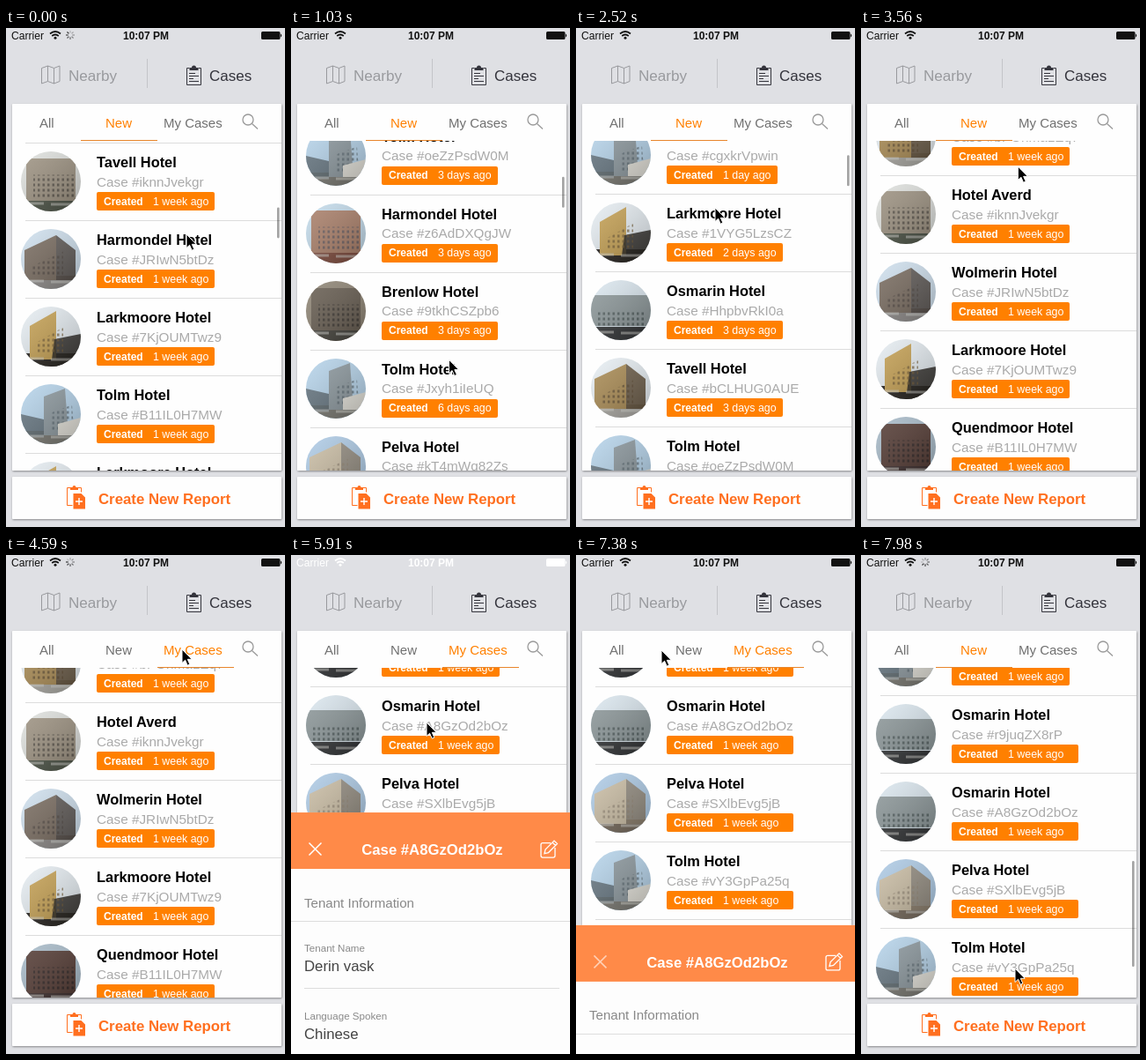
Animation of 317x566 px, one loop 8000 ms. Source, as an HTML page:

```html
<!DOCTYPE html>
<html lang="en">
<head>
<meta charset="utf-8">
<title>Case list</title>
<style>
html, body { margin: 0; width: 100%; height: 100%; overflow: hidden; background: #dfe0e4; }
svg { display: block; }
#stage { width: 100%; height: 100%; }
text { font-family: "Liberation Sans", Arial, sans-serif; fill: currentColor; white-space: pre; }
.line { fill: none; stroke: currentColor; }
.bold { font-weight: 700; }
.name { font-size: 16.4px; font-weight: 700; fill: #000; }
.code { font-size: 15.3px; fill: #aaa; }
.badge { font-size: 12.4px; color: #fff; }
.tab { font-size: 15px; }
.label { font-size: 11.6px; color: #8a8a8a; }
.value { font-size: 16.8px; color: #444; }
</style>
</head>
<body>
<svg id="stage" viewBox="0 0 317 566">
  <defs>
    <clipPath id="disc"><circle cx="34" cy="34" r="34"/></clipPath>
    <linearGradient id="shade" x2="1" y2="1">
      <stop stop-color="#fff" stop-opacity=".15"/>
      <stop offset="1" stop-color="#000" stop-opacity=".25"/>
    </linearGradient>
    <filter id="lift" x="-5%" y="-5%" width="110%" height="115%">
      <feDropShadow dx="0.5" dy="1" stdDeviation="0.8" flood-opacity=".4"/>
    </filter>
  </defs>
  <rect width="317" height="566" fill="#dfe0e4"/>

  <g color="#999a9e">
    <path class="line" d="M40.5 45.5l7-2.5 7 2.5 6.500-2.500v17.500l-6.500 2.500-7-2.500-7 2.500zM47.500 43v17.500M54.500 45.500v17.500"/>
    <text x="71" y="59.500" font-size="17.100">Nearby</text>
  </g>
  <path d="M160.500 35v33" stroke="#c3c4c8"/>
  <g color="#34343c">
    <path class="line" d="M208.500 45.500h-3v19h16v-19h-3"/>
    <path fill="currentColor" d="M208.500 48v-3h2.500a2.500 2.500 0 0 1 5 0h2.500v3z"/>
    <path class="line" d="M208 51.500h7M208 54.500h11M208 57.500h5M208 60.500h11"/>
    <text x="231" y="59.500" font-size="17">Cases</text>
  </g>

  <rect x="7" y="86" width="306" height="416" rx="1" fill="#fefefe" filter="url(#lift)"/>
  <text class="tab" x="38" y="112.500" color="#707070">All</text>
  <text class="tab" id="tabNew" x="113" y="112.500">New</text>
  <text class="tab" id="tabMine" x="179" y="112.500">My Cases</text>
  <g class="line" color="#999" stroke-width="1.300">
    <circle cx="275" cy="104" r="6"/><path d="M279.500 108.500l6.500 6"/>
  </g>
  <svg x="7" y="128" width="306" height="374" overflow="hidden">
    <g id="listNew"></g>
    <g id="listMine"></g>
  </svg>
  <rect id="underline" y="127" width="87" height="1" fill="#e8862c"/>
  <rect id="bar" x="308" width="2.600" rx="1.300" fill="#000" opacity=".36"/>

  <rect x="7" y="509" width="306" height="48" rx="1" fill="#fefefe" filter="url(#lift)"/>
  <g color="#ff6f1f">
    <path class="line" d="M73 521.500h-3.500v20h6M82 521.500h3.500v5"/>
    <path fill="currentColor" d="M73 524v-3h2.500a2 2 0 0 1 4 0H82v3zM76.500 528h9l4.500 4.500v13H76.500z"/>
    <path stroke="#fff" stroke-width="1.400" d="M83 533v8M79 537h8"/>
    <text class="bold" x="105" y="540" font-size="16.800">Create New Report</text>
  </g>

  <g id="sheet">
    <rect width="317" height="566" fill="#fdfdfd"/>
    <rect width="317" height="64" fill="#ff8a48"/>
    <g color="#fff">
      <path id="close" class="line" stroke-width="1.500" d="M20.500 34.500l14 14M34.500 34.500l-14 14"/>
      <text class="bold" x="160.500" y="48" font-size="16.700" text-anchor="middle">Case #A8GzOd2bOz</text>
      <path class="line" stroke-width="1.300" d="M295 34.500h-9q-2 0-2 2V49q0 2 2 2h12q2 0 2-2V40M288 46.500l1-4.500 10-10 3.500 3.500-10 10zM297 34l3.500 3.500"/>
    </g>
    <text x="15" y="107.500" font-size="15.100" color="#888">Tenant Information</text>
    <path stroke="#dcdcdc" d="M0 123.500h317M15 199.500h290M15 276.500h290"/>
    <text class="label" x="15" y="157.500">Tenant Name</text>
    <text class="value" x="15" y="180">Derin vask</text>
    <text class="label" x="15" y="234.500">Language Spoken</text>
    <text class="value" x="15" y="257">Chinese</text>
  </g>

  <g id="status">
    <text x="6" y="12.500" font-size="12.100">Carrier</text>
    <path class="line" stroke-width="1.700" d="M50 6.500q6-5 12 0M52.200 9q3.800-3 7.600 0"/>
    <circle cx="56" cy="11.300" r="1.500" fill="currentColor"/>
    <g id="spinner"></g>
    <text class="bold" x="133" y="12.500" font-size="12">10:07 PM</text>
    <path fill="currentColor" d="M291.500 4h18.500q1.500 0 1.500 1.500v6q0 1.500-1.500 1.500h-18.500q-1.500 0-1.500-1.500v-6q0-1.500 1.500-1.500zM312 6.500q2.500 2 0 4z"/>
  </g>

  <path id="cursor" d="M0 0v15.500l3.600-3.300 2.600 6 2.700-1.200-2.600-5.700h4.900z" fill="#000" stroke="#fff"/>
</svg>

<script>
const $ = id => document.getElementById(id);
const TICK = 147.5, LOOP = 8000, ROW = 88;

// Flat building pictures: shape, sky, wall, windows, ground
const PHOTOS = {
  facade: ["front", "#dfe1de", "#9c9180", "#453f38", "#4c5346"],
  brown:  ["corner", "#cfe0ee", "#776a5e", "#4a423c", "#8d8a88"],
  yellow: ["block", "#e6edf2", "#c5a052", "#6e5630", "#25211d"],
  tower:  ["tower", "#b5d3ea", "#8b979d", "#56646d", "#77766f"],
  dark:   ["front", "#a7bac8", "#513831", "#211c1d", "#3b2c2b"],
  umber:  ["front", "#8d8373", "#655b4f", "#2e2a27", "#45433c"],
  green:  ["wide", "#dbe7ef", "#8b9698", "#3f4a4c", "#303234"],
  tan:    ["corner", "#e8eff4", "#a98a52", "#57452c", "#aaa8a2"],
  beige:  ["corner", "#aecbe6", "#cabda4", "#8f826f", "#74685a"],
  rust:   ["front", "#c4dcec", "#a97e68", "#54525a", "#7d4a3c"]
};
const SHAPES = {
  front:  ["M6 8H62V56H6z"],
  wide:   ["M0 17H68V52H0z"],
  corner: ["M4 24L40 7V58H4z", "M40 7L62 24V58H40z"],
  block:  ["M10 22L40 5V60H10z", "M38 37L68 31V68H34z"],
  tower:  ["M26 14L50 5L54 58H26z", "M0 34L26 40V60H0z"]
};

function photo(kind) {
  const [shape, sky, wall, glass, ground] = PHOTOS[kind];
  const [main, side] = SHAPES[shape];
  let windows = "";
  for (let y = 20; y < 54; y += 6) windows += `M8 ${y}H60`;
  return `<g clip-path="url(#disc)"><rect width="68" height="68" fill="${sky}"/>
    <rect y="53" width="68" height="15" fill="${ground}"/>
    <path d="${main}" fill="${wall}"/>
    ${side ? `<path d="${side}" fill="${shape == "block" ? ground : glass}" opacity=".85"/>` : ""}
    <path d="${windows}" stroke="${glass}" stroke-width="3" stroke-dasharray="2.5 3" opacity=".7"
      clip-path="path('${main}')"/>
    ${shape == "tower" ? '<path d="M42 45L68 38V58H42z" fill="#e4e2da"/>' : ""}
    <path d="M8 59h18M34 60h24" stroke="#d9d9d4" stroke-width="3" opacity=".5"/>
    <rect width="68" height="68" fill="url(#shade)"/></g>`;
}

const BADGE_WIDTH = { week: 134, days: 132, day: 126 };

function row([name, code, age, kind], index) {
  return `<g transform="translate(0 ${index * ROW})">
    <path d="M15 .5h291" stroke="#dcdcdc"/>
    <g transform="translate(10 10)">${photo(kind)}</g>
    <text class="name" x="96" y="28">${name}</text>
    <text class="code" x="96" y="49.500">Case #${code}</text>
    <g class="badge"><rect x="96" y="56" width="${BADGE_WIDTH[age.split(" ")[1]]}" height="21" rx="2" fill="#ff8000"/>
    <text class="bold" x="104" y="70.500" font-size="12">Created</text>
    <text x="160" y="70.500">${age}</text></g></g>`;
}

const newCases = [
  ["Pelva Hotel", "Wn5tQe30Lk", "1 day ago", "beige"],
  ["Osmarin Hotel", "hR7uVxM2pd", "1 day ago", "green"],
  ["Tolm Hotel", "cgxkrVpwin", "1 day ago", "tower"],
  ["Larkmoore Hotel", "1VYG5LzsCZ", "2 days ago", "yellow"],
  ["Osmarin Hotel", "HhpbvRkI0a", "3 days ago", "green"],
  ["Tavell Hotel", "bCLHUG0AUE", "3 days ago", "tan"],
  ["Tolm Hotel", "oeZzPsdW0M", "3 days ago", "tower"],
  ["Harmondel Hotel", "z6AdDXQgJW", "3 days ago", "rust"],
  ["Brenlow Hotel", "9tkhCSZpb6", "3 days ago", "umber"],
  ["Tolm Hotel", "Jxyh1iIeUQ", "6 days ago", "tower"],
  ["Pelva Hotel", "kT4mWq82Zs", "6 days ago", "beige"],
  ["Tavell Hotel", "bPOnmaLEq7", "1 week ago", "tan"],
  ["Hotel Averd", "iknnJvekgr", "1 week ago", "facade"],
  ["Wolmerin Hotel", "JRIwN5btDz", "1 week ago", "brown"],
  ["Larkmoore Hotel", "7KjOUMTwz9", "1 week ago", "yellow"],
  ["Quendmoor Hotel", "B11IL0H7MW", "1 week ago", "dark"],
  ["Larkmoore Hotel", "vD8sYc61Ro", "1 week ago", "yellow"]
];

// Before the reload some cases still carry another hotel
const renamed = {
  "Hotel Averd": ["Tavell Hotel", "facade"],
  "Wolmerin Hotel": ["Harmondel Hotel", "brown"],
  "Quendmoor Hotel": ["Tolm Hotel", "tower"]
};
const staleCases = newCases.map(([name, code, age, kind]) => {
  const [oldName, oldKind] = renamed[name] || [name, kind];
  return [oldName, code, age, oldKind];
});

// The second list is only ever seen from this row on
const FIRST_MINE = 7;
const myCases = [
  ["Tolm Hotel", "Gq2LrX94ne", "1 week ago", "tower"],
  ["Osmarin Hotel", "r9juqZX8rP", "1 week ago", "green"],
  ["Osmarin Hotel", "A8GzOd2bOz", "1 week ago", "green"],
  ["Pelva Hotel", "SXlbEvg5jB", "1 week ago", "beige"],
  ["Tolm Hotel", "vY3GpPa25q", "1 week ago", "tower"],
  ["Larkmoore Hotel", "uM6wTk07Hs", "1 week ago", "yellow"]
];

const rows = (cases, first = 0) => cases.map((item, i) => row(item, i + first)).join("");
$("listNew").innerHTML = `<g id="stale">${rows(staleCases)}</g><g id="fresh">${rows(newCases)}</g>`;
$("listMine").innerHTML = rows(myCases, FIRST_MINE);
const myBadges = [...$("listMine").querySelectorAll(".badge rect")].slice(1);
$("spinner").innerHTML = Array.from({ length: 8 }, (_, i) =>
  `<path d="M0-2.200v-2.800" stroke="currentColor" stroke-width="1.200" opacity="${0.2 + i * 0.09}" transform="rotate(${i * 45})"/>`).join("");

// Decelerating progress from 0 to 1 between two ticks
const glide = (tick, from, to) => {
  const p = Math.min(1, Math.max(0, (tick - from) / (to - from)));
  return 1 - (1 - p) ** 2.3;
};

// Pointer strokes: first tick, last tick, end point
const STROKES = [
  [0, 10, 176, 396], [14, 17, 158, 204], [23, 27, 200, 107], [32, 36, 154, 190],
  [41, 46, 28, 42], [48, 50, 97, 108], [50, 54, 175, 469]
];

function pointer(tick) {
  let x = 205, y = 234;
  for (const [from, to, endX, endY] of STROKES) {
    const p = glide(tick, from, to);
    x += (endX - x) * p;
    y += (endY - y) * p;
  }
  return [x, y];
}

const scrollNew = tick => 1056 - 568 * glide(tick, 0, 10) - 488 * glide(tick, 10, 12)
  + 206 * glide(tick, 14, 17) + 813 * glide(tick, 17, 21);
const scrollMine = tick => 773 - 98 * glide(tick, 51, 54);
const sheetTop = tick => 566 * (1 - glide(tick, 39, 43) + glide(tick, 48.22, 52.22));
const underlineX = tick => 85 + 87 * (glide(tick, 28, 30) - glide(tick, 50, 52));

const within = (tick, from, to) => tick >= from && tick <= to;
const show = (id, on) => $(id).style.display = on ? "" : "none";
const move = (id, x, y, extra = "") => $(id).setAttribute("transform", `translate(${x} ${y})${extra}`);

function draw(tick) {
  const mineLoaded = tick >= 33, mineTab = within(tick, 29, 50), closing = tick >= 48;
  const scroll = mineLoaded ? scrollMine(tick) : scrollNew(tick);

  show("listNew", !mineLoaded);
  show("listMine", mineLoaded);
  show("stale", tick < 4);
  show("fresh", tick >= 4);
  move(mineLoaded ? "listMine" : "listNew", 0, 2 - scroll);
  myBadges.forEach(badge => badge.setAttribute("width", closing ? 144 : 134));

  $("tabNew").style.color = mineTab ? "#707070" : "#ff8000";
  $("tabMine").style.color = mineTab ? "#ff8000" : "#707070";
  $("underline").setAttribute("x", underlineX(tick));

  show("bar", tick < 24 || tick > 51);
  $("bar").setAttribute("y", 130 + scroll * (mineLoaded ? 0.3215 : 0.0695));
  $("bar").setAttribute("height", mineLoaded ? 120 : 35);

  move("sheet", 0, sheetTop(tick));
  $("close").setAttribute("opacity", closing ? 0.6 : 1);
  $("status").style.color = within(tick, 40, 48) ? "#fff" : "#111";
  show("spinner", tick < 4 || within(tick, 29, 35) || tick >= 51);
  move("spinner", 73, 8, ` rotate(${tick * 45})`);
  move("cursor", ...pointer(tick));
}

const start = performance.now();
function frame() {
  const elapsed = Math.max(0, performance.now() - start) % LOOP;
  draw(Math.floor(elapsed / TICK));
  requestAnimationFrame(frame);
}
frame();
</script>
</body>
</html>
```
